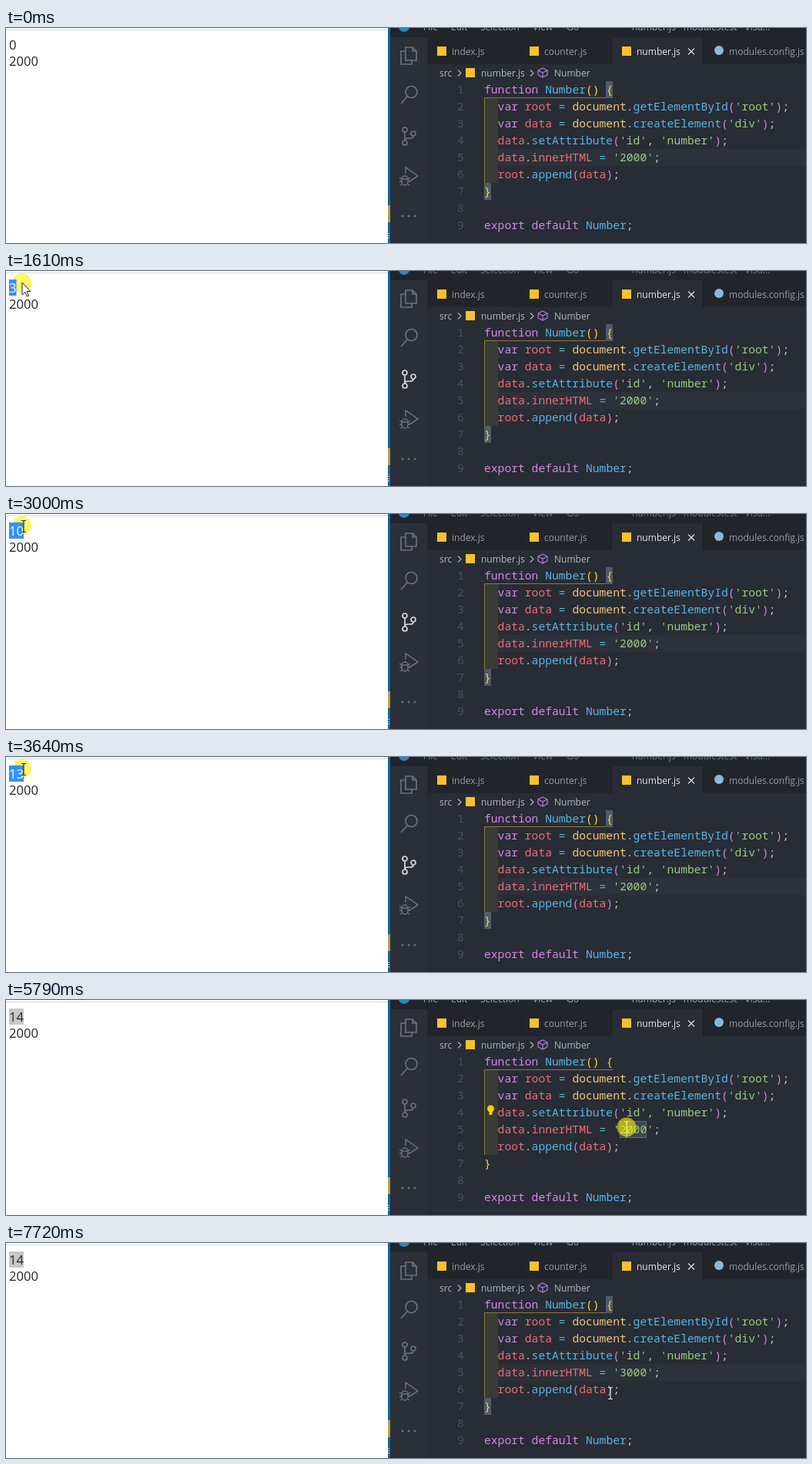
Animation of 1039x279 px, one loop 8 s. Source, as an HTML page with a canvas:

```html
<!DOCTYPE html>
<html lang="en">
<head>
<meta charset="utf-8">
<style>
  html, body { margin: 0; width: 100%; height: 100%; overflow: hidden; background: #fff; }
  canvas { display: block; }
</style>
</head>
<body>
<canvas id="stage" width="1039" height="279"></canvas>
<script>
const ctx = document.getElementById('stage').getContext('2d');
const LOOP = 8000, STEP = 76.4;
const UI = '12px "Open Sans", sans-serif';
const PAGE = '16.6px "Open Sans", sans-serif';
const CODE = '500 14.667px "Noto Sans Mono", monospace';
const COL = 8.8, CODE_X = 621, LINE_H = 22, CODE_TOP = 69;
const EDITOR = '#282c34', TABS = '#21252b', TAB_TEXT = '#969ca7', CRUMB = '#b4b9c3', ICON = '#6c717c';
const PURPLE = '#d586e8', RED = '#ef6b74', BLUE = '#56b4e9', CYAN = '#4dbccb',
  GREEN = '#98cb7c', GOLD = '#f0c674', BRACE = '#ffd633', PAREN = '#da82e4', PLAIN = '#c3c8d2';

// Moments at which one more click is counted
const CLICKS = [910, 1460, 1610, 1840, 1990, 2240, 2390, 2620, 2850, 3000, 3240, 3490, 3640, 3790];
// Press marker: on, off, on, off ...
const PRESSES = [910, 1000, 1300, 1380, 1460, 1530, 1610, 1760, 1840, 1920, 1990, 2160, 2240, 2540,
  2620, 2770, 2850, 2920, 3000, 3170, 3240, 3410, 3490, 3560, 3640, 3790, 5330, 5870];
const BLINKS = [5410, 6020, 6250, 6940, 7260, 7720];
// Pointer route: time, x, y
const ROUTE = [[70, 645, 200], [300, 523, 142], [450, 250, 70], [670, 21, 15], [2750, 21, 15],
  [2840, 23, 16], [3790, 23, 16], [4020, 560, 48], [4180, 930, 56], [4410, 829, 181], [4560, 829, 181],
  [4710, 814, 169], [4860, 806, 166], [5020, 804, 165], [5180, 806, 165], [6640, 806, 165],
  [6790, 768, 186], [6930, 785, 195]];

const between = (t, a, b) => t >= a && t < b;
const passed = (list, t) => list.filter(v => v <= t).length;
const isOn = (list, t) => passed(list, t) % 2 === 1;

function rect(x, y, w, h, color) {
  ctx.fillStyle = color;
  ctx.fillRect(x, y, w, h);
}
function disc(x, y, r, color) {
  ctx.fillStyle = color;
  ctx.beginPath();
  ctx.arc(x, y, r, 0, 7);
  ctx.fill();
}
function text(str, x, y, font, color) {
  ctx.font = font;
  ctx.fillStyle = color;
  ctx.fillText(str, x, y);
}
function shape(path, x, y, stroke, width = 1.5, fill) {
  const p = new Path2D(path);
  ctx.save();
  ctx.translate(x, y);
  ctx.lineWidth = width;
  ctx.strokeStyle = stroke;
  if (fill) { ctx.fillStyle = fill; ctx.fill(p); }
  ctx.stroke(p);
  ctx.restore();
}
function pressMark(x, y) {
  disc(x, y, 12.5, 'rgba(255, 242, 0, .6)');
}

function drawPage(t) {
  const count = String(passed(CLICKS, t));
  const selected = t >= 1460, active = t < 5410;
  rect(0, 0, 497, 279, '#fff');
  rect(0, 2, 496, 1, '#d5dce2');
  if (t < 3800 && isOn(PRESSES, t)) pressMark(20.5, 15.5);
  if (selected) rect(4, 11, count.length * 9.5, 21, active ? '#3390ff' : '#c8c8c8');
  text(count, 4, 28, PAGE, selected && active ? '#fff' : '#212529');
  text('2000', 4, 49, PAGE, '#212529');
}

function drawFrame(t, edited) {
  const focused = !between(t, 910, 5410);
  const titleColor = focused ? '#9da5b4' : '#747a86';
  rect(496, 0, 543, 279, EDITOR);
  rect(499, 0, 540, 12, TABS);
  rect(547, 12, 492, 35, TABS);
  rect(787, 12, 118, 35, EDITOR);
  for (const x of [667, 786, 905]) rect(x, 12, 1, 35, '#1b1e23');
  rect(499, 12, 48, 267, '#2b2f38');
  rect(496, 0, 3, 279, '#0d68a5');
  rect(496, 230, 3, 22, '#b3a548');
  for (let y = 266; y < 274; y += 3) rect(496, y, 2, 1, '#ccc');

  disc(517, -2, 7, '#2489ca');
  [['File', 542], ['Edit', 578], ['Selection', 616], ['View', 684], ['Go', 728],
    [(edited ? '● ' : '') + 'number.js - modulestest - Visu...', 813]]
    .forEach(([s, x]) => text(s, x, 3, UI, titleColor));

  [['index.js', 579], ['counter.js', 699], ['number.js', 819]].forEach(([s, x], i) => {
    rect(x - 19, 24, 12, 12, '#fbc02d');
    text(s, x, 34.5, UI, i === 2 ? '#e4e7ec' : TAB_TEXT);
  });
  disc(926, 29, 6, '#8ab8d8');
  text('modules.config.js', 939, 34.5, UI, TAB_TEXT);
  if (edited) disc(890, 30.5, 4, '#d7dae0');
  else shape('M-4-4L4 4M4-4L-4 4', 890, 30.5, '#d7dae0', 1.3);

  [['src', 563], ['number.js', 617], ['Number', 712]].forEach(([s, x]) => text(s, x, 62.5, UI, CRUMB));
  rect(597, 52, 12, 12, '#fbc02d');
  for (const x of [589, 683]) shape('M-2-4L2 0L-2 4', x, 58.5, CRUMB, 1.1);
  shape('M0-6L6-3V3L0 6L-6 3V-3ZM-6-3L0 0L6-3M0 0V6', 697, 58, '#b180d7', 1.2);
}

function drawActivityBar(t, edited) {
  const git = between(t, 300, 3950) ? '#d7dae0' : ICON;
  shape('M-4-11H5L10-6V6H-4ZM5-11V-6H10M-4-6H-10V11H4V6', 523, 36, ICON, 1.7);
  shape('M11-4A7.5 7.5 0 1 1-4-4A7.5 7.5 0 1 1 11-4M-2 2L-10 11', 523, 87, ICON, 1.7);
  shape('M-2-8A3 3 0 1 1-8-8A3 3 0 1 1-2-8M-2 9A3 3 0 1 1-8 9A3 3 0 1 1-2 9' +
    'M9-3A3 3 0 1 1 3-3A3 3 0 1 1 9-3M-5-5V6M6 0Q6 3 2 3H-1Q-5 3-5 6', 523, 140, git, 1.7);
  shape('M-4-3V-11L12 0L1 7M-9 4A4 4 0 0 1-1 4V8A4 4 0 0 1-9 8ZM-9 4H-1' +
    'M-12 2L-9 4M2 2L-1 4M-12 7H-9M-1 7H2M-11 12L-8 10M1 12L-2 10', 523, 192, ICON, 1.5);
  for (const x of [515, 523, 531]) disc(x, 244, 1.5, ICON);
  if (edited) {
    disc(531, 44, 8, '#4d78cc');
    text('1', 528.5, 48, 'bold 9px "Open Sans", sans-serif', '#fff');
  }
}

function tokenColor(token, row) {
  if (token[0] === "'") return GREEN;
  if (/^(function|var|export|default)$/.test(token)) return PURPLE;
  if (/^(root|data|innerHTML)$/.test(token)) return RED;
  if (token === 'document') return GOLD;
  if (/\w/.test(token)) return BLUE;
  if (token === '=') return CYAN;
  if (/[(){}]/.test(token)) return row === 0 || row === 6 ? BRACE : PAREN;
  return PLAIN;
}

function drawCode(t) {
  const deleting = between(t, 6250, 6480);
  const amount = t < 6250 ? '2000' : deleting ? '000' : '3000';
  const lines = [
    'function Number() {',
    "  var root = document.getElementById('root');",
    "  var data = document.createElement('div');",
    "  data.setAttribute('id', 'number');",
    `  data.innerHTML = '${amount}';`,
    '  root.append(data);',
    '}', '', 'export default Number;'];
  const marked = between(t, 5410, 6250);
  const link = between(t, 7260, 7570);

  if (!marked) rect(CODE_X, 157, 418, LINE_H, '#2c313a');
  rect(CODE_X, 91, 18, 110, '#383c35');
  rect(CODE_X, 90, 167, 1, '#8f7833');
  rect(CODE_X, 90, 1, 111, '#8f7833');
  if (marked) {
    rect(797, 157, 35, LINE_H, '#3f4550');
    shape('M.5.5H34.5V21.5H.5Z', 797, 157, '#646c7b', 1);
  } else {
    rect(779, 69, 9, LINE_H, '#515a6b');
    rect(621, 201, 9, LINE_H, '#515a6b');
  }

  lines.forEach((line, row) => {
    const y = CODE_TOP + row * LINE_H + 16;
    text(String(row + 1), 586, y, CODE, '#495162');
    for (const m of line.matchAll(/'[^']*'|\w+|\S/g)) {
      const linked = link && row === 5 && m[0] === 'data';
      const x = CODE_X + m.index * COL;
      text(m[0], x, y, CODE, linked ? '#61a0ef' : tokenColor(m[0], row));
      if (linked) rect(x, y + 2, 4 * COL, 1, '#61a0ef');
    }
  });

  if (between(t, 5790, 6250)) {
    disc(629.5, 141, 4.5, '#ffcc00');
    rect(627.5, 145, 4, 4, '#ffcc00');
  }
  if (isOn(BLINKS, t)) rect(deleting ? 796 : 805, 157, 2, LINE_H, '#528bff');
}

function pointerAt(t) {
  const i = ROUTE.findIndex(p => p[0] > t);
  if (i < 0) return ROUTE[ROUTE.length - 1].slice(1);
  if (i === 0) return ROUTE[0].slice(1);
  const [t0, x0, y0] = ROUTE[i - 1], [t1, x1, y1] = ROUTE[i];
  const k = (t - t0) / (t1 - t0);
  return [x0 + (x1 - x0) * k, y0 + (y1 - y0) * k];
}

function drawPointer(t) {
  if (t < 70) return;
  const [x, y] = pointerAt(Math.floor((t + 10) / STEP) * STEP);
  const beam = x > 547 && y > 48 || between(t, 2840, 3830);
  if (beam) {
    shape('M-3-7.5H-1L0-6.5L1-7.5H3M0-6.5V6.5M-3 7.5H-1L0 6.5L1 7.5H3', x, y, x < 497 ? '#333' : '#e0e0e0', 1.2);
  } else {
    shape('M0 0V16L4 12.5L6.5 18L8.5 17L6 11.5H11Z', x, y, '#222', 1, '#fff');
  }
  if (x > 497 && isOn(PRESSES, t)) pressMark(x, y);
}

function draw(now) {
  const t = now % LOOP;
  const edited = between(t, 6250, 7420);
  drawPage(t);
  drawFrame(t, edited);
  drawActivityBar(t, edited);
  drawCode(t);
  drawPointer(t);
}

const start = performance.now();
(function tick() {
  draw(performance.now() - start);
  requestAnimationFrame(tick);
})();
</script>
</body>
</html>
```
